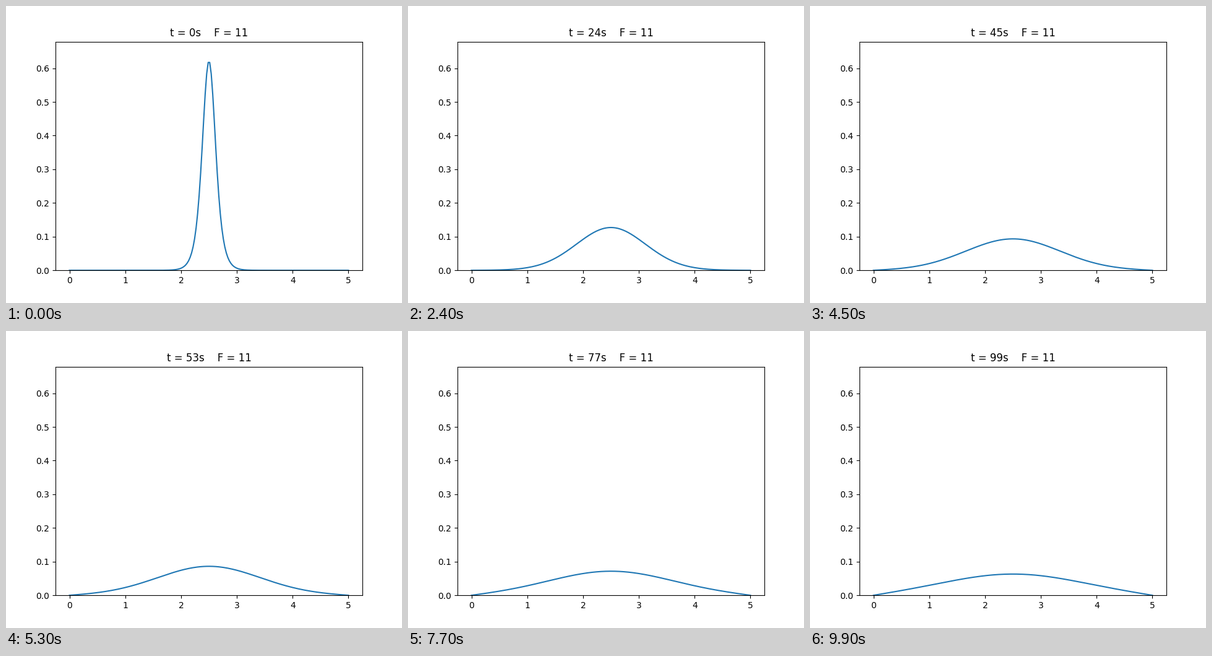
These frames come from a looping animation (640x480 px, 10000 ms). A matplotlib script:

```python
import numpy as np
import matplotlib.pyplot as plt
from matplotlib.animation import FuncAnimation

LENGTH = 5.0
POINTS = 186
FOURIER = 11      # a * dt / dx**2
SIGMA = 0.08      # width of the initial bump
STEPS = 100

x = np.linspace(0, LENGTH, POINTS)


def implicit_matrix():
    """Backward Euler heat operator with both ends held at zero."""
    off = np.full(POINTS - 1, -float(FOURIER))
    m = np.diag(np.full(POINTS, 1.0 + 2 * FOURIER))
    m += np.diag(off, 1) + np.diag(off, -1)
    m[0] = m[-1] = 0
    m[0, 0] = m[-1, -1] = 1
    return m


def solve():
    step = np.linalg.inv(implicit_matrix())
    u = np.exp(-(x - LENGTH / 2) ** 2 / (2 * SIGMA ** 2))
    u[0] = u[-1] = 0
    states = []
    for _ in range(STEPS):
        u = step @ u
        states.append(u)
    return states


states = solve()

fig, ax = plt.subplots(figsize=(6.4, 4.8), dpi=100)
line, = ax.plot(x, states[0])
ax.set_ylim(0, 1.1 * states[0].max())
title = ax.set_title("")


def update(i):
    line.set_ydata(states[i])
    title.set_text(f"t = {i}s    F = {FOURIER}")
    return line, title


anim = FuncAnimation(fig, update, frames=STEPS, interval=100,
                     repeat=True, repeat_delay=0, blit=False)
plt.show()
```
